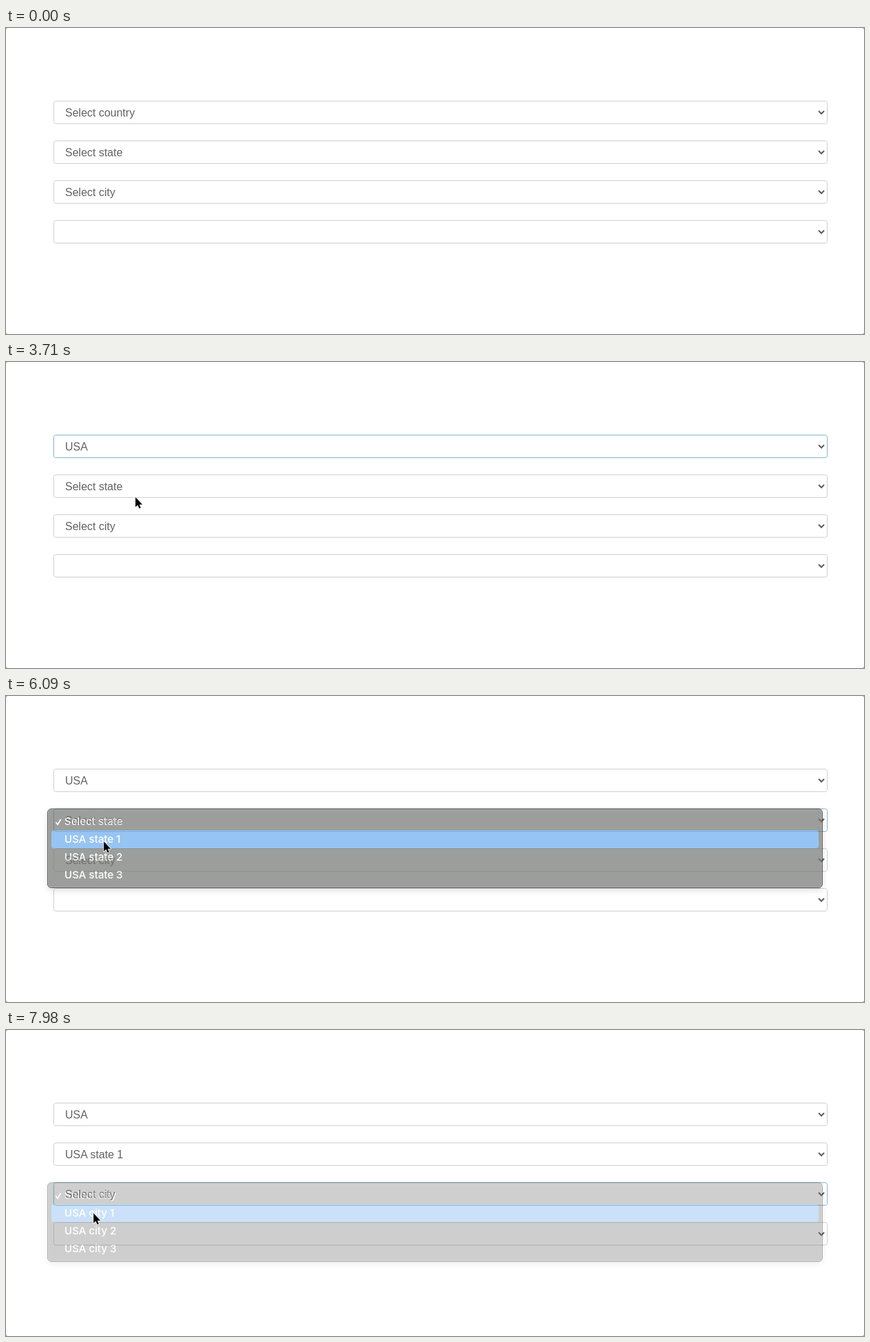
Animation of 1248x446 px, one loop 8 s. Source, as an HTML page:

```html
<!DOCTYPE html>
<html lang="en">
<head>
<meta charset="utf-8">
<title>Linked selects</title>
<style>
  html, body { margin: 0; width: 100%; height: 100%; overflow: hidden; background: #999; }
  svg { display: block; width: 1248px; height: 446px; background: #fff; border-radius: 3px; }
  .field rect { fill: #fff; stroke: #cfcfcf; }
  .field.focus rect { stroke: #86b3cb; }
  .field text { font: 16px "Liberation Sans", Arial, sans-serif; fill: #626262; }
  .chevron { fill: none; stroke: #5c5c5c; stroke-width: 2; }
  .menu { filter: drop-shadow(0 4px 4px rgba(0, 0, 0, .16)); }
  .menu text { font: 500 15.1px Inter, sans-serif; fill: #fff; }
  .tick { fill: none; stroke: #fff; stroke-width: 1.7; }
  .tick.thin { stroke-width: 1.2; }
</style>
</head>
<body>
<svg id="stage" viewBox="0 0 1248 446"></svg>
<script>
const LOOP = 8000, STEP = 70, ROW = 26;
const stage = document.getElementById('stage');
const fieldTop = i => 106 + 58 * i;

const country = ['Select country', 'Ukraine', 'Russia', 'USA'];
const numbered = kind => ['Select ' + kind, ...[1, 2, 3].map(n => `USA ${kind} ${n}`)];

// Each menu fades for two steps from its close time.
const menus = [
  { field: 0, open: 1750, close: 3570, rows: country },
  { field: 2, open: 4200, close: 5040, rows: ['Select city'] },
  { field: 1, open: 5390, close: 6090, rows: numbered('state') },
  { field: 2, open: 6930, close: 7910, rows: numbered('city') }
];

// Pointer stops: time, x, y
const path = [
  [140, 1171, 369], [280, 640, 250], [420, 230, 165], [560, 110, 132], [770, 287, 123],
  [1470, 287, 123], [1680, 262, 121], [2030, 262, 121], [2660, 188, 197],
  [3710, 188, 197], [4130, 140, 241], [4620, 140, 241], [4830, 150, 190],
  [5040, 150, 190], [5320, 154, 185], [5460, 154, 185], [5880, 142, 212],
  [6230, 142, 212], [6440, 148, 241], [7140, 148, 241], [7700, 127, 267]
];
const presses = [[910, 980], [1680, 1820], [3430, 3570], [4130, 4270], [4970, 5040],
  [5320, 5460], [5950, 6090], [6930, 7000], [7770, 7910]];

const within = (t, a, b) => t >= a && t < b;

function pointerAt(t) {
  const i = path.findIndex(p => p[0] > t);
  if (i < 0) return path[path.length - 1].slice(1);
  const [t0, x0, y0] = path[Math.max(0, i - 1)], [t1, x1, y1] = path[i];
  const k = Math.max(0, Math.min(1, (t - t0) / (t1 - t0)));
  return [x0 + (x1 - x0) * k, y0 + (y1 - y0) * k];
}

function focusAt(t) {
  const opened = menus.filter(m => t >= m.open).pop();
  return opened ? opened.field : -1;
}

function field(label, i, focused) {
  const y = fieldTop(i);
  return `<g class="field ${focused ? 'focus' : ''}">
    <rect x="69.5" y="${y + .5}" width="1125" height="33" rx="3"/>
    <text x="86" y="${y + 23}">${label}</text>
    <path class="chevron" d="M1182 ${y + 15}l4 4l4 -4"/></g>`;
}

function menu(m, t, pointerY) {
  const y = fieldTop(m.field), h = m.rows.length * ROW + 12;
  const hot = Math.floor((pointerY - y - 6) / ROW);
  const alpha = t < m.close ? 1 : t < m.close + STEP ? .7 : .35;
  const bar = hot >= 0 && hot < m.rows.length
    ? `<rect x="66" y="${y + 6 + hot * ROW}" width="1116" height="${ROW}" rx="4" fill="#6aabee"/>` : '';
  const labels = m.rows.map((s, i) => `<text x="85" y="${y + 24 + i * ROW}">${s}</text>`).join('');
  return `<g class="menu" opacity="${alpha}">
    <rect x="60.5" y="${y + .5}" width="1127" height="${h - 1}" rx="5.5" fill="#737573" stroke="#1a1a1a"/>
    <rect x="61.5" y="${y + 1.5}" width="1125" height="${h - 3}" rx="4.5" fill="none" stroke="#8b8d8b"/>
    ${bar}${labels}
    <path class="tick ${hot === 0 ? 'thin' : ''}" d="M72.5 ${y + 20}l2.6 3.4l4.6 -7.6"/></g>`;
}

function pointer(x, y, pressed) {
  const ring = pressed ? `<g fill="none"><circle cy="1" r="19.5" stroke="#fff" stroke-width="5"/>
    <circle cy="1" r="19.5" stroke="#000" stroke-width="3"/></g>` : '';
  return `<g transform="translate(${x} ${y})">${ring}
    <path d="M.3 0V14.6L3.6 11.6L5.8 16.6L8 15.6L5.9 10.7H10.4Z" stroke="#fff" stroke-width="1.6"
      stroke-linejoin="round" paint-order="stroke"/></g>`;
}

function draw(t) {
  const [x, y] = pointerAt(t), focus = focusAt(t);
  const values = [
    t < 3710 ? 'Select country' : 'USA',
    t < 6230 ? 'Select state' : 'USA state 1',
    'Select city', ''
  ];
  let out = values.map((v, i) => field(v, i, i === focus)).join('');
  for (const m of menus)
    if (within(t, m.open, m.close + 2 * STEP)) out += menu(m, t, y);
  if (t >= 140 && !within(t, 6440, 6790))
    out += pointer(x, y, presses.some(([a, b]) => within(t, a, b)));
  stage.innerHTML = out;
}

const start = performance.now();
let shown = -1;
function tick() {
  const t = Math.floor((performance.now() - start) % LOOP / STEP) * STEP;
  if (t !== shown) draw(shown = t);
  requestAnimationFrame(tick);
}
tick();
</script>
</body>
</html>
```
